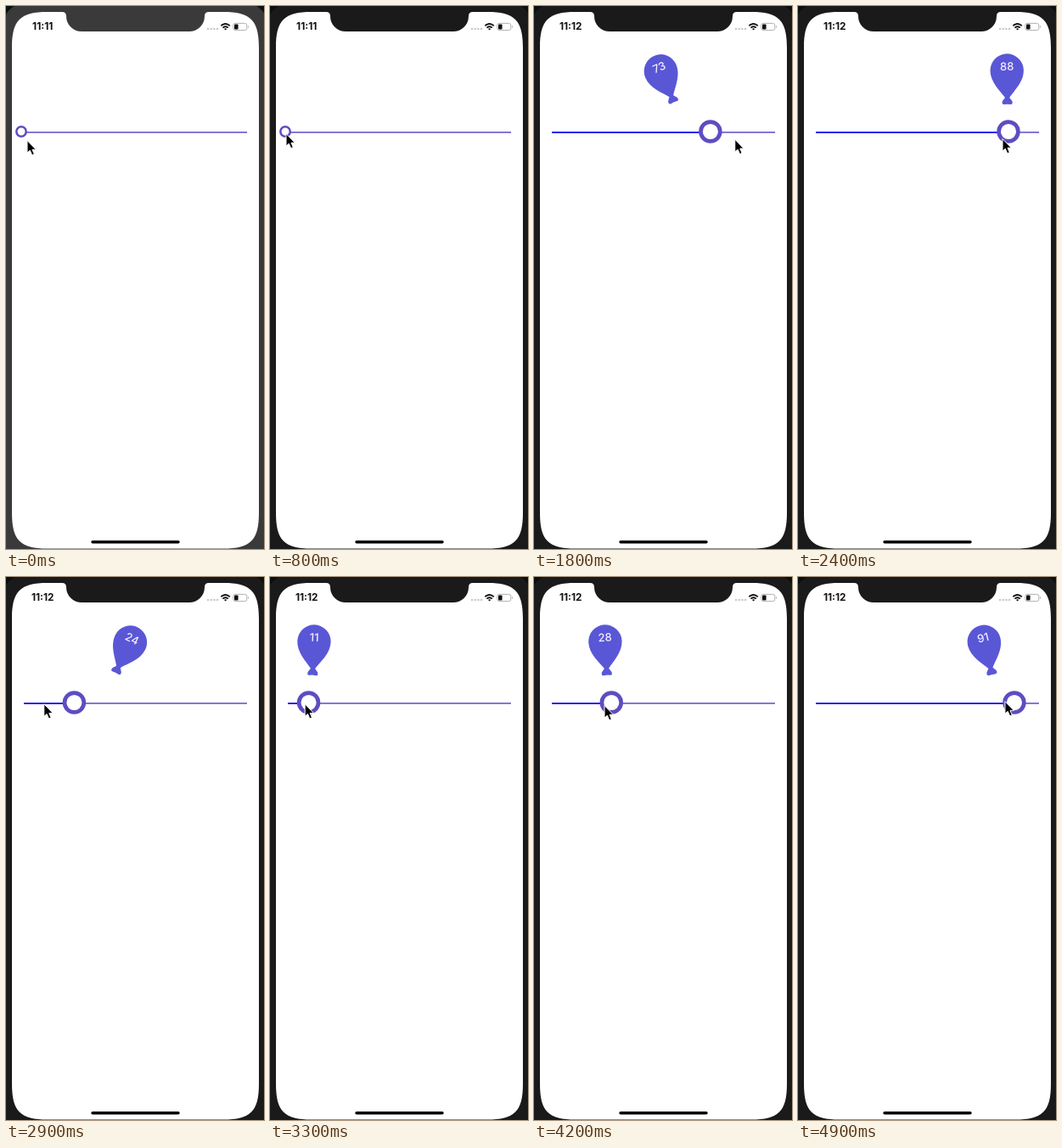
An HTML page for the animation above (5 s loop, 304 by 640 pixels).

```html
<!DOCTYPE html>
<html lang="en">
<head>
<meta charset="utf-8">
<title>Balloon slider</title>
<style>
  html, body { margin: 0; width: 100%; height: 100%; overflow: hidden; background: #0b0f0e; }
  svg { display: block; width: 100vw; height: 100vh; }
  text { font-family: Inter, "Liberation Sans", sans-serif; text-anchor: middle; }
</style>
</head>
<body>
<svg viewBox="0 0 304 640">
  <rect x="-5" y="-5" width="315" height="690" rx="32" id="bezel"/>
  <path fill="#fff" d="M7 49C7 16.7 16.7 7 49 7H66Q71 7 71 12A18 18 0 0 0 89 30H216A18 18 0 0 0 234 12Q234 7 239 7H256C288.3 7 298 16.7 298 49V597.5C298 629.8 288.3 639.5 256 639.5H49C16.7 639.5 7 629.8 7 597.5Z"/>

  <text id="clock" x="43.2" y="28.4" font-size="11.8" font-weight="650" fill="#111"></text>
  <g fill="#c9c9c9">
    <circle cx="238" cy="27" r="1.3"/><circle cx="241.7" cy="27" r="1.3"/>
    <circle cx="245.3" cy="27" r="1.3"/><circle cx="249" cy="27" r="1.3"/>
  </g>
  <g fill="none" stroke="#111" stroke-width="1.8">
    <path d="M253.4 23.3Q258.6 18.6 263.8 23.3"/>
    <path d="M255.4 25.6Q258.6 22.8 261.8 25.6"/>
    <path d="M257 26.9Q258.6 25.6 260.2 26.9L258.6 28.5Z" fill="#111" stroke="none"/>
  </g>
  <rect x="267.8" y="20.4" width="16" height="8.2" rx="2.3" fill="none" stroke="#aaa" stroke-width=".9"/>
  <rect x="269" y="21.6" width="4.6" height="5.8" rx="1" fill="#111"/>
  <path d="M285 23Q287 24.5 285 26Z" fill="#aaa"/>
  <rect x="100.3" y="630" width="104.4" height="3.6" rx="1.8"/>

  <rect x="21" y="148.1" width="263" height="1.6" fill="#6656cc"/>
  <rect id="fill" x="21" y="148" height="2" fill="#2a20f0"/>
  <circle id="thumb" cy="148" fill="#fff" stroke="#5d4dc1"/>
  <g id="balloon">
    <path fill="#5a57d6" d="M-2.6 22C-8 14-19.7 4-19.7-10A19.7 19.7 0 0 1 19.7-10C19.7 4 8 14 2.6 22L5.7 26Q7 30 4 30Q0 29.3-4 30Q-7 30-5.7 26Z"/>
    <text id="value" y="-10.2" font-size="13" font-weight="550" fill="#f1efff"></text>
  </g>
  <path id="cursor" d="M0-.5V14L3.3 11.2L5.7 16.7L8.3 15.6L6 10.2H10.4Z" fill="#000" stroke="#fff" stroke-width="1" stroke-linejoin="round"/>
</svg>
<script>
const LOOP = 5000, STEP = 100, DT = 5;
const GRAB = 800, REST = 18, OFFSET = 7;
const THUMB_LAG = 70, BALLOON_LAG = 140;

// Where the hand pauses or turns: [ms, x, y].
const hand = [
  [0, 25, 159], [300, 19, 151], [GRAB, 19, 151], [1350, 116, 149], [1540, 100, 151],
  [1830, 241, 158], [2450, 241, 157], [2960, 37, 150], [3200, 37, 150], [3550, 58, 151],
  [3750, 51, 151], [4080, 87, 152], [4250, 82, 152], [4430, 84, 153], [4780, 260, 149],
  [4920, 243, 147]
];

const el = id => document.getElementById(id);
const set = (id, attrs) => {
  for (const k in attrs) el(id).setAttribute(k, attrs[k]);
};
const clamp = (v, lo, hi) => Math.min(hi, Math.max(lo, v));
const ease = u => u * u * (3 - 2 * u);

function cursorAt(t) {
  const i = hand.findIndex(k => k[0] > t);
  if (i < 0) return hand[hand.length - 1].slice(1);
  const [t0, x0, y0] = hand[i - 1], [t1, x1, y1] = hand[i];
  const s = ease((t - t0) / (t1 - t0));
  return [x0 + (x1 - x0) * s, y0 + (y1 - y0) * s];
}

// The thumb trails the hand and the balloon trails the thumb.
function simulate() {
  const poses = [];
  let thumb = REST, balloon = REST;
  for (let t = 0; t < LOOP; t += DT) {
    const [x, y] = cursorAt(t);
    if (t % STEP === 0) poses.push({ x, y, thumb, balloon });
    const goal = t < GRAB ? REST : x + OFFSET;
    thumb += (goal - thumb) * DT / THUMB_LAG;
    balloon += (thumb - balloon) * DT / BALLOON_LAG;
  }
  return poses;
}
const poses = simulate();

function draw(t) {
  const { x, y, thumb, balloon } = poses[Math.floor(t / STEP)];
  const grow = ease(clamp((t - GRAB) / 350, 0, 1));
  const tilt = clamp((balloon - thumb) * 0.42, -26, 26);
  set('bezel', { fill: t < 500 ? '#3a3a3a' : '#1a1a1a' });
  el('clock').textContent = t < 1000 ? '11:11' : '11:12';
  set('fill', { width: Math.max(0, thumb - 21) });
  set('thumb', { cx: thumb, r: 5.7 + 5.7 * grow, 'stroke-width': 2.5 + 2.2 * grow });
  set('balloon', {
    transform: `translate(${balloon} ${148 - 62 * grow}) rotate(${tilt}) scale(${grow})`,
    visibility: grow > 0 ? 'visible' : 'hidden'
  });
  el('value').textContent = Math.ceil((thumb - REST) / 2.63);
  set('cursor', { transform: `translate(${x} ${y})` });
}

const start = performance.now();
function tick() {
  const t = (performance.now() - start) % LOOP;
  draw(Math.floor(t / STEP) * STEP);
  requestAnimationFrame(tick);
}
tick();
</script>
</body>
</html>
```
